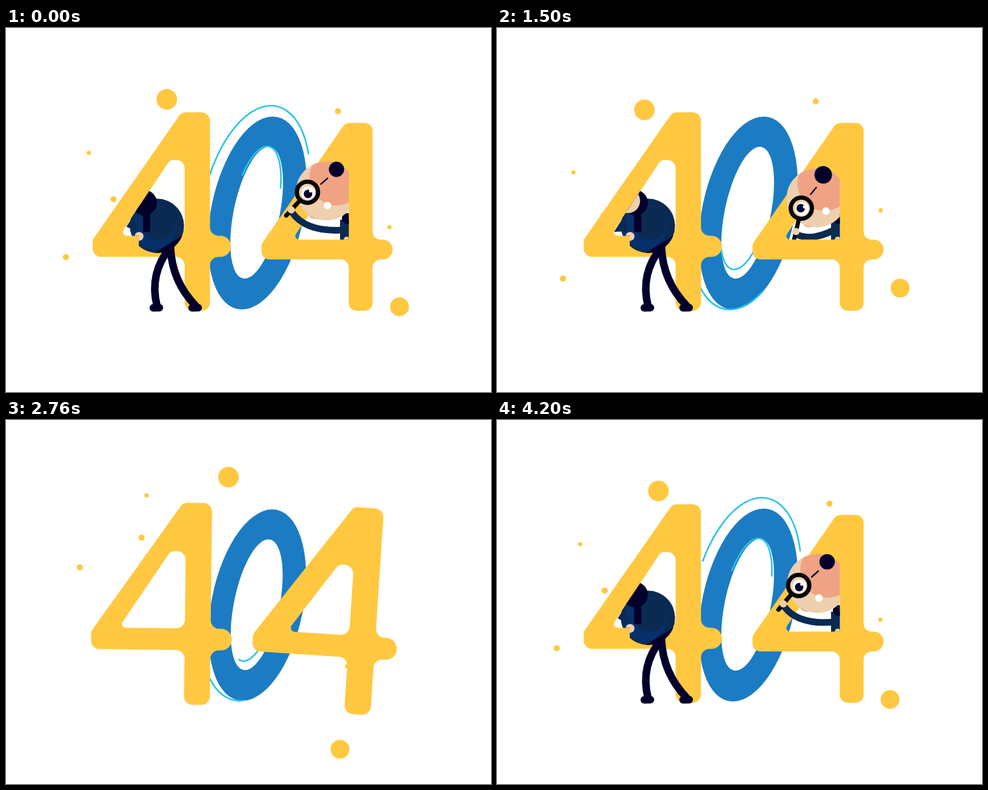
Write an HTML page with a canvas that moves like this. It is 800 by 600 pixels and loops after 4230 ms.

```html
<!DOCTYPE html>
<html lang="en">
<head>
<meta charset="utf-8">
<title>404</title>
<style>
html, body { margin: 0; width: 100%; height: 100%; overflow: hidden; background: #fff; }
canvas { display: block; }
</style>
</head>
<body>
<canvas id="stage" width="800" height="600"></canvas>
<script>
const g = document.getElementById('stage').getContext('2d');
const LOOP = 4230, SHIFT = 2130, RAD = Math.PI / 180;
const YELLOW = '#ffc840', BLUE = '#1b7cc3', CYAN = '#25c4ea', DARK = '#02002b',
  NAVY = '#0a2a52', NAVY2 = '#06306a', SLEEVE = '#0d3058', SKIN = '#eecfae',
  PINK = '#efa384', BLACK = '#050508';

// Timing helpers
const clamp = u => Math.min(1, Math.max(0, u));
const mix = (a, b, u) => a + (b - a) * u;
const smooth = (t, from, to) => {
  const u = clamp((t - from) / (to - from));
  return u * u * (3 - 2 * u);
};
const easeOut = (u, power) => 1 - (1 - clamp(u)) ** power;
const polar = (r, deg) => [r * Math.cos(deg * RAD), r * Math.sin(deg * RAD)];

// Drawing helpers
function group(draw) {
  g.save();
  draw();
  g.restore();
}

function oval(color, x, y, rx, ry = rx) {
  g.fillStyle = color;
  g.beginPath();
  g.ellipse(x, y, rx, ry, 0, 0, 7);
  g.fill();
}

// Two points make a line, three a quadratic, four a cubic
function line(color, width, [x, y, ...rest], cap = 'round') {
  g.strokeStyle = color;
  g.lineWidth = width;
  g.lineCap = cap;
  g.beginPath();
  g.moveTo(x, y);
  if (rest.length === 2) g.lineTo(...rest);
  else if (rest.length === 4) g.quadraticCurveTo(...rest);
  else g.bezierCurveTo(...rest);
  g.stroke();
}

function magnifier(x, y, r, width, deg, reach) {
  const [dx, dy] = polar(1, deg);
  line(BLACK, width, [x + dx * r, y + dy * r, x + dx * reach, y + dy * reach]);
  g.beginPath();
  g.arc(x, y, r, 0, 7);
  g.stroke();
}

function roundPoly(path, pts) {
  const last = pts[pts.length - 1];
  path.moveTo((last[0] + pts[0][0]) / 2, (last[1] + pts[0][1]) / 2);
  pts.forEach(([x, y, r], i) => {
    const next = pts[(i + 1) % pts.length];
    path.arcTo(x, y, next[0], next[1], r);
  });
  path.closePath();
}

// A four: outline from its edges, then the counter
function four(left, tipY, topX, top, stemL, stemR, nub, barT, barB, r, [holeX, holeTop, holeLeft]) {
  const path = new Path2D(), bottom = 466, end = (barB - barT) / 2 - .3;
  roundPoly(path, [[left, tipY, 10], [topX, top, r], [stemR, top, r], [stemR, barT, r],
    [nub, barT, end], [nub, barB, end], [stemR, barB, r], [stemR, bottom, r],
    [stemL, bottom, r], [stemL, barB, r], [left, barB, r]]);
  roundPoly(path, [[stemL, holeTop, 14], [holeX, holeTop, 12], [holeLeft, barT, 6], [stemL, barT, 14]]);
  return path;
}
const fourLeft = four(143, 349, 289.6, 139, 294.7, 336.5, 371, 342.4, 377.3, 14, [270.3, 217.5, 187.7]);
const fourRight = four(421.5, 356, 560, 156.5, 565.3, 604.7, 637.5, 348.8, 381.6, 13, [543, 243.5, 472]);

// Slanted ellipses: centre, half width, half height, shear
const OUTER = [414.5, 305, 77.5, 159, .16], INNER = [413.5, 304.5, 38.6, 108.7, .184],
  TRACK_OUT = [410.5, 296, 87.6, 168, .158], TRACK_IN = [411, 296.5, 37.5, 101.5, .197];

function slanted([x, y, w, h, k], from = 0, to = 360) {
  const path = new Path2D(), arc = new Path2D();
  arc.ellipse(0, 0, w, h, 0, from * RAD, to * RAD);
  path.addPath(arc, new DOMMatrix([1, 0, -k, 1, x, y]));
  return path;
}
const zero = slanted(OUTER);
zero.addPath(slanted(INNER));

// Springs up around a centre, untwisting as it grows
function pop(age, x, y, draw) {
  if (age <= 0) return;
  const swing = .0103 * age;
  const scale = 1 - Math.exp(-.8 * swing) * Math.cos(swing);
  group(() => {
    g.translate(x, y);
    g.rotate(37 * (scale - 1) * RAD);
    g.scale(scale, scale);
    g.translate(-x, -y);
    draw();
  });
}

function fill(color, path) {
  g.fillStyle = color;
  g.fill(path, 'evenodd');
}

// The two lines run round the zero in opposite directions
function drawLines(t) {
  if (t < 250) return;
  const length = 130 * easeOut((t - 250) / 1100, 2) - 25 * smooth(t, 2130, 3060);
  const inner = .127 * t - 59;
  const outer = 209 - .15 * (t - 360) + .038 * Math.max(0, t - 1470);
  g.strokeStyle = CYAN;
  g.lineWidth = 2.6;
  g.lineCap = 'butt';
  g.stroke(slanted(TRACK_OUT, outer - length, outer));
  g.stroke(slanted(TRACK_IN, inner, inner + length));
}

// Dots: radius, distance, resting angle, delay
const dots = [
  [17, 236, -132, 99], [15.5, 289.5, 23.8, 37], [5, 309, 160.5, 102], [5, 225, 180.3, 70],
  [5, 227.6, -56.8, 36], [3.5, 284, 194.7, 175], [3.5, 232.6, -2.8, 270]
];
function drawDots(t) {
  const swirl = 54.8 * (1 - t / 4300) ** 3;
  for (const [r, far, angle, delay] of dots) {
    const [x, y] = polar(far * easeOut((t - delay) / 1160, 4), angle + swirl);
    oval(YELLOW, 400.5 + x, 311 + y, r * clamp(t / 100));
  }
}

// Poses: body x, y, hip angle, hip spread, then x, y and bend of each foot
const climb = [404, 334, 163, 8, 320, 447, 8, 354, 457, 11];
const stand = [348, 346.5, 92, 9, 312, 458, 42, 350, 458, 52];
const hide = [249, 326, 58, 0, 249, 458, 25, 313, 458, 20];

function drawLeg(hx, hy, fx, fy, bend) {
  const len = Math.hypot(fx - hx, fy - hy);
  const cx = (hx + fx) / 2 - (fy - hy) / len * bend, cy = (hy + fy) / 2 + (fx - hx) / len * bend;
  line(DARK, 12.5, [hx, hy, cx, cy, fx, fy]);
  line(DARK, 12.5, [fx - 6, fy + 3.3, fx + 4, fy + 3]);
}

function drawFace() {
  oval(DARK, -34, -105, 13.5, 19);
  oval(DARK, 52, -98.5, 13, 19);
  oval(PINK, -41, -69, 14, 15);
  oval(PINK, 51, -61, 15);
  group(() => {
    g.beginPath();
    g.roundRect(-37, -149, 91, 134.5, 45);
    g.clip();
    oval(SKIN, 9, -82, 80);
    oval(PINK, 57, -81, 48, 68);
  });
  oval('#fff', -12, -101, 12, 9);
  oval('#fff', 27, -98.5, 13, 9);
  oval(DARK, -9.5, -101, 9);
  oval(DARK, 29, -98, 9);
  oval('#e99a7d', 6, -83, 5.5);
  oval('#fff', 5, -48, 7);
}

function drawMan(t, turn) {
  if (t < 700) return;
  const climbing = t < 1150, hiding = t > 1760, r = 44.7;
  const rise = smooth(t, 1060, 1400), leave = smooth(t, 1600, 1900);
  const [x, y, angle, spread, ...feet] = climb.map((v, i) => mix(mix(v, stand[i], rise), hide[i], leave));
  group(() => {
    if (climbing) {
      const gap = slanted(INNER);
      gap.rect(0, 0, 405, 600);
      g.clip(gap);
      g.translate(110 * (1 - smooth(t, 700, 990)), 0);
    } else if (hiding) {
      g.clip(new Path2D('M300 200L282 200 187 342.5 219 342.5 219 480 420 480 420 200Z'));
    }
    const [dx, dy] = polar(1, angle);
    for (const side of [1, -1]) {
      const foot = side > 0 ? feet.slice(0, 3) : feet.slice(3);
      drawLeg(x + dx * 42 - dy * spread * side, y + dy * 42 + dx * spread * side, ...foot);
    }

    g.translate(x, y);
    if (climbing) {
      oval(DARK, 42, -12, 21);
      line(SLEEVE, 13, [24, -28, 32, -52, 62, -68]);
    } else if (!hiding) {
      line(SLEEVE, 13, [34, -20, 72, -12, 72, 26, 44, 54], 'butt');
    }
    oval(NAVY, 0, 0, r);
    if (hiding) {
      oval(NAVY2, -6, 2, 37);
      oval(NAVY, 3, -4, 27);
    }
    const half = Math.acos(36 / r);
    g.fillStyle = DARK;
    g.beginPath();
    g.arc(0, 0, r, angle * RAD - half, angle * RAD + half);
    g.fill();

    if (hiding) {
      fill(NAVY, new Path2D(`M-38 -18L${-50 - 6 * turn} ${1 + 9 * turn} -34 9Z`));
      g.fillStyle = DARK;
      g.fillRect(-23, -22, 12, 32);
      oval(DARK, -21, -38, 21);
      oval(SKIN, -59 + 26 * turn, -41, 20);
      oval(SKIN, -29.5, 17.5, 7.3);
    } else if (!climbing) {
      g.fillRect(-4, -22, 12, 27.5);
      oval(SKIN, 40, 57.5, 7);
      drawFace();
      line(NAVY, 12, [-34, 15, -48, 15, -62, 1]);
      oval('#fff', -47, -56, 4.5);
      magnifier(-54, -49.5, 22, 8, 105, 64);
      oval(SKIN, -67, -2.5, 7.3);
    }
  });
}

// Bobs between raised (0) and lowered (1)
const dipAt = t => 1 - 1.15 * smooth(t, 1720, 2280) + 1.15 * smooth(t, 2280, 3000);

function drawPeek(t, dip) {
  if (t < 1780) return;
  const lensX = 497 + 5 * dip, lensY = 269.3 + 27.7 * dip, tilt = 134 - 31 * dip;
  const [hx, hy] = polar(39.5, tilt);
  const handX = lensX + hx, handY = lensY + hy;
  group(() => {
    g.beginPath();
    g.rect(400, 150, 165.5, 198.8);
    g.clip();
    g.translate(120 * (1 - smooth(t, 1780, 2060)), 0);
    line(NAVY, 11, [handX + 2, handY + 5, handX + 25, 336 + 16 * dip, 556, 333]);
    g.fillRect(551, 316, 20, 40);
    g.fillStyle = NAVY;
    g.fillRect(551, 316, 20, 40);
    oval(DARK, 563, 314, 9);
    group(() => {
      g.translate(528.5 - dip, 268 + 12 * dip);
      g.rotate(-10 * dip * RAD);
      oval(PINK, -19, 35, 11);
      oval(SKIN, 0, 0, 50, 48.5);
      group(() => {
        g.clip();
        oval(PINK, 17, -21, 45);
      });
      oval(DARK, 17, -35.5, 12.5 + 2 * dip);
      line(DARK, 2.4, [-9, -11.5 + 4 * dip, 2, -21 + 4 * dip]);
      oval('#fff', 1 + 10 * dip, 24, 6.2);
    });
    oval(SKIN, lensX, lensY, 17);
    oval('#fff', lensX + 1, lensY + 1, 11);
    oval(DARK, lensX + 1 - 2 * dip, lensY + 3 - 3 * dip, 7);
    oval('#fff', lensX + 5, lensY - 2, 2.5);
    magnifier(lensX, lensY, 17.5, 7, tilt, 52);
    oval(SKIN, handX, handY, 6);
    oval(SKIN, 562, 349, 5);
  });
}

function frame() {
  const t = (performance.now() + SHIFT) % LOOP, dip = dipAt(t);
  g.fillStyle = '#fff';
  g.fillRect(0, 0, 800, 600);
  pop(t - 120, 416, 305, () => {
    fill(BLUE, zero);
    drawLines(t);
  });
  drawDots(t);
  pop(t - 256, 255, 306, () => fill(YELLOW, fourLeft));
  drawMan(t, t < SHIFT ? 0 : clamp(dip));
  pop(t - 392, 529.5, 311, () => fill(YELLOW, fourRight));
  drawPeek(t, dip);
  requestAnimationFrame(frame);
}
frame();
</script>
</body>
</html>
```
